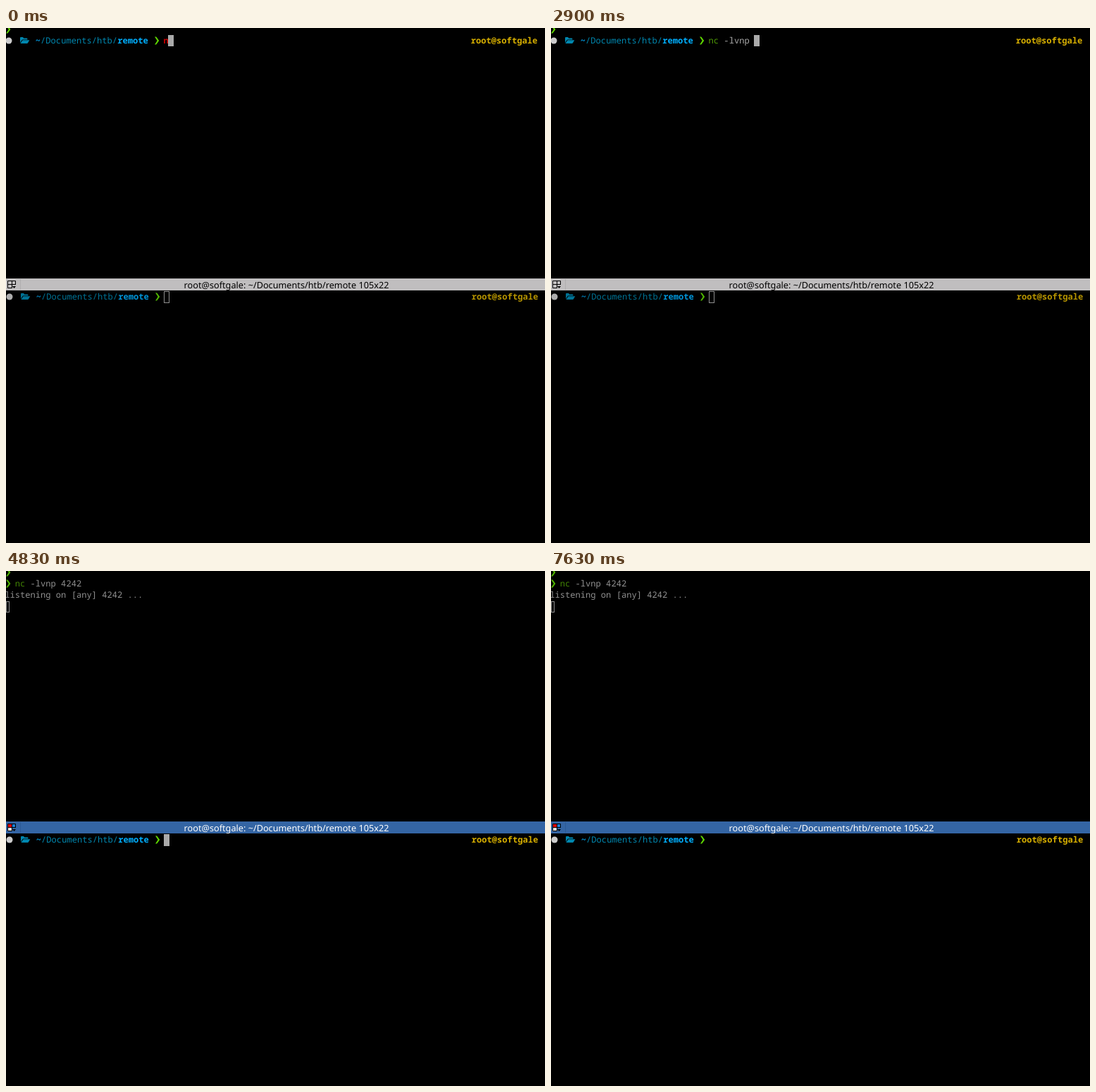
Recreate the animation shown at these times as an HTML page. Size 765 px wide and 732 px high, loop 8 s.

```html
<!DOCTYPE html>
<html lang="en">
<head>
<meta charset="utf-8">
<title>Split terminal</title>
<style>
  html, body { margin: 0; width: 100%; height: 100%; overflow: hidden; background: #000; }
  svg { display: block; width: 100%; height: 100%; }
  text { white-space: pre; text-rendering: geometricPrecision; }
  .pane { font: 500 12.117px "Noto Sans Mono", monospace; fill: #aaa; }
  .inactive { opacity: .85; }
  .bold { font-weight: 700; }
  .path { fill: #0087af; }
  .here { fill: #00afff; }
  .user { fill: #d7af00; }
  .arrow { fill: #5fd700; }
  .valid { fill: #4e9a06; }
  .unknown { fill: #c00; font-weight: 700; }
  .cursor { fill: #aaa; height: 16px; }
  .cursor.hollow { fill: none; stroke: #aaa; height: 15px; }
  #bottom .cursor { height: 17px; }
  #bottom .cursor.hollow { height: 16px; }
  .title { font: 12.7px "Noto Sans", sans-serif; text-anchor: middle; fill: #000; }
  .bar { fill: #c0bebf; }
  .split { fill: #b0aeaf; }
  .frame { fill: none; stroke: #000; }
  .tile { fill: none; }
  .focused .title { fill: #fff; }
  .focused .bar { fill: #3465a4; }
  .focused .split { fill: #2c5a96; }
  .focused .red { fill: #d00; }
  .focused .blue { fill: #1a7fd4; }
  .focused .pale { fill: #ddd; }
</style>
</head>
<body>
<svg viewBox="0 0 765 732">
  <defs>
    <path id="chevron" d="M0 0h2.2l4 5.5-4 5.5H0l3.6-5.5z"/>
    <path id="folder" d="M0 8V1Q0 0 1 0H4L5.2 1.4H9.4Q10.4 1.4 10.4 2.4V3.4H4Q2.8 3.4 2.2 4.4ZM.4 9 3 5Q3.4 4.3 4.2 4.3H13.3L11 8.3Q10.6 9 9.8 9Z"/>
  </defs>
  <rect width="765" height="732"/>
  <g id="top" class="pane"></g>
  <g id="bottom" class="pane" transform="translate(1 364)"></g>
  <g id="titlebar">
    <rect class="bar" y="356" width="765" height="17"/>
    <rect class="split" x="20" y="357" width="1" height="15"/>
    <rect class="tile red" x="2" y="360" width="6" height="5"/>
    <rect class="tile blue" x="8" y="360" width="5" height="5"/>
    <rect class="tile pale" x="2" y="365" width="6" height="5"/>
    <path class="frame" d="M8.5 369.5H2.5V359.5H13.5V365M2.5 364.5H13.5M8.5 359.5V369.5"/>
    <path d="M9 367h5l-2.5 3z"/>
    <text class="title" x="398" y="370">root@softgale: ~/Documents/htb/remote 105x22</text>
  </g>
</svg>
<script>
const CELL = 7.27, LEFT = -1.8, PERIOD = 8000;
const RUN_AT = 3930, FOCUS_AT = 4830, INPUT_COL = 31;
const column = n => LEFT + n * CELL;

// time, typed text, cursor shown, command recognised
const topSteps = [
  [0, "n", 1, 0], [370, "n", 0, 0], [830, "nc", 1, 0], [870, "nc", 1, 1],
  [1100, "nc ", 1, 1], [1600, "nc ", 0, 1], [1700, "nc -", 1, 1],
  [2470, "nc -l", 1, 1], [2570, "nc -lv", 1, 1], [2670, "nc -lvn", 1, 1],
  [2770, "nc -lvnp", 1, 1], [2900, "nc -lvnp ", 1, 1],
  [3370, "nc -lvnp 4", 1, 1], [3470, "nc -lvnp 42", 1, 1], [3700, "nc -lvnp 4242", 1, 1],
  [RUN_AT, "nc -lvnp 4242", 1, 1], [4530, "nc -lvnp 4242", 0, 1],
  [FOCUS_AT, "nc -lvnp 4242", 1, 1]
];
const bottomSteps = [
  [0, "", 1, 1], [5330, "", 0, 1], [5530, "clear", 1, 1], [6100, "clear", 0, 1],
  [6200, "clea", 1, 1], [6330, "clea", 1, 0], [7030, "", 1, 1], [7630, "", 0, 1]
];

const text = (col, y, cls, str) =>
  `<text x="${column(col)}" y="${y}" class="${cls}">${str}</text>`;
const chevron = (col, y) =>
  `<use href="#chevron" class="arrow" x="${column(col) + 2}" y="${y}"/>`;

// Snapped to whole pixels; an outline sits half a pixel inside its cell.
function cursor(col, y, hollow) {
  const inset = hollow ? .5 : 0;
  const left = Math.max(0, Math.floor(column(col))) + inset;
  const right = Math.round(column(col + 1)) - inset;
  return `<rect class="cursor ${hollow ? "hollow" : ""}" x="${left}" y="${y + inset}"
    width="${right - left}"/>`;
}

function typed(col, str, valid) {
  const [command] = str.split(" ");
  return text(col, 22, valid ? "valid" : "unknown", command) +
    text(col + command.length, 22, "", str.slice(command.length));
}

const prompt =
  `<circle cx="4" cy="18" r="4.5" fill="#ccc"/>
   <use href="#folder" class="path" x="20" y="13"/>` +
  text(6, 22, "here bold", "~") +
  text(7, 22, "path", "/Documents/htb/") +
  text(22, 22, "here bold", "remote") +
  chevron(29, 12.5) +
  text(91, 22, "user bold", "root@softgale");

function promptLine([, str, shown, valid], hollow) {
  return prompt + typed(INPUT_COL, str, valid) +
    (shown ? cursor(INPUT_COL + str.length, 10, hollow) : "");
}

function listening([, str, shown, valid], hollow) {
  return chevron(0, 12.5) + typed(2, str, valid) +
    text(0, 38, "", "listening on [any] 4242 ...") +
    (shown ? cursor(0, 43, hollow) : "");
}

const [topPane, bottomPane, titlebar] =
  ["top", "bottom", "titlebar"].map(id => document.getElementById(id));
const stepAt = (steps, t) => steps.findLast(step => step[0] <= t);
let lastKey = "";

function draw(now) {
  const t = now % PERIOD;
  const upper = stepAt(topSteps, t), lower = stepAt(bottomSteps, t);
  const focused = t >= FOCUS_AT;
  const key = `${upper[0]}/${lower[0]}`;
  if (key !== lastKey) {
    lastKey = key;
    const line = t < RUN_AT ? promptLine : listening;
    topPane.innerHTML = chevron(0, -3.5) + line(upper, focused);
    bottomPane.innerHTML = promptLine(lower, !focused);
    topPane.classList.toggle("inactive", focused);
    bottomPane.classList.toggle("inactive", !focused);
    titlebar.classList.toggle("focused", focused);
  }
  requestAnimationFrame(draw);
}
draw(performance.now());
</script>
</body>
</html>
```
